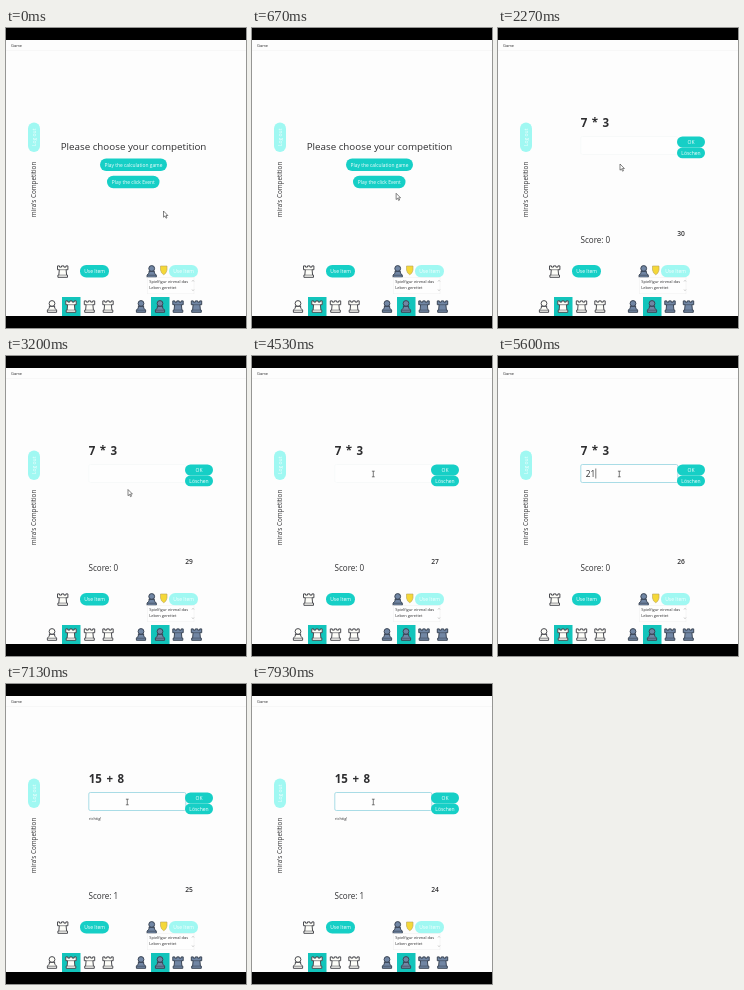
An HTML page for the animation above (8 s loop, 240 px wide and 300 px high).

```html
<!DOCTYPE html>
<html lang="en">
<head>
<meta charset="utf-8">
<title>Game</title>
<style>
  html, body { margin: 0; width: 100%; height: 100%; overflow: hidden; background: #000; }
  svg { display: block; width: 100vw; height: 100vh; }
  text { font-family: "Open Sans", "Noto Sans", sans-serif; fill: #2e2e30; }
  .pill { fill: #16cfc6; }
  .pale { fill: #a0f8f2; }
  .hover { fill: #06605f; }
  .label { fill: #f6ffff; text-anchor: middle; }
  .light { --body: #fdfdf8; --edge: #4a4b50; }
  .dark { --body: #7186a4; --edge: #3b4656; }
  .piece { fill: var(--body); stroke: var(--edge); stroke-width: 1; stroke-linejoin: round; }
</style>
</head>
<body>
<svg viewBox="0 0 240 300" preserveAspectRatio="none">
  <defs>
    <g id="rook" class="piece">
      <path d="M-5.200-5.600h2v1.200h2V-5.600h2.400v1.200h2V-5.600h2V-1.800H3.400L3.900 3.600H4.800V5.800H-4.800V3.600H-3.900L-3.400-1.800H-5.200Z"/>
      <path d="M-3.400-1.800H3.400M-3.900 3.600H3.900" stroke-width=".6"/>
    </g>
    <g id="pawn" class="piece">
      <path d="M-2.200-.6Q-2.400 2-4.600 3.600V5.800H4.600V3.600Q2.400 2 2.200-.6Z"/>
      <circle cy="-3" r="2.900"/>
      <path d="M-3.200-.2H3.200M-4.300 3.700H4.300" stroke-width=".7"/>
    </g>
  </defs>

  <rect y="12" width="240" height="276" fill="#fdfdfd"/>
  <path d="M0 22.500H240" stroke="#f3f3f3" stroke-width=".6"/>
  <text x="5" y="18.600" font-size="4">Game</text>

  <rect class="pale" x="22" y="94.500" width="12" height="29.500" rx="6"/>
  <text class="label" font-size="5" transform="translate(29.700 109.300) rotate(-90)">Log out</text>
  <text font-size="6.300" text-anchor="middle" transform="translate(30.300 161.500) rotate(-90)">mira's Competition</text>

  <g id="menu">
    <text x="127.500" y="121.500" font-size="9.800" text-anchor="middle">Please choose your competition</text>
    <rect id="calc" class="pill" x="94" y="130.500" width="67" height="12.500" rx="6.200"/>
    <text class="label" x="127.500" y="138.600" font-size="4.900">Play the calculation game</text>
    <rect class="pill" x="101" y="147.700" width="52.500" height="12.500" rx="6.200"/>
    <text class="label" x="127.300" y="155.800" font-size="4.900">Play the click Event</text>
  </g>

  <g id="quiz">
    <text id="task" x="82.800" y="98.600" font-size="11.500" font-weight="700" word-spacing="1.500"></text>
    <rect id="field" x="82.800" y="108.500" width="97" height="18" rx="1.500" fill="#fefefe"/>
    <text id="answer" x="87.800" y="120.700" font-size="8.300"></text>
    <path id="caret" d="M97.800 112.500V122.500" stroke="#444" stroke-width=".7"/>
    <rect class="pill" x="179" y="108.500" width="28" height="11" rx="5.500"/>
    <text class="label" x="193" y="115.900" font-size="5">OK</text>
    <rect class="pill" x="179" y="119.500" width="28" height="10.800" rx="5.400"/>
    <text class="label" x="193" y="126.700" font-size="5">Löschen</text>
    <text id="praise" x="83" y="135.700" font-size="3.900">richtig!</text>
    <text id="score" x="82.500" y="214.600" font-size="8.100"></text>
    <text id="timer" x="183" y="208.200" font-size="6.700" font-weight="600" text-anchor="middle"></text>
  </g>

  <use href="#rook" class="light" x="56.700" y="243.500"/>
  <rect class="pill" x="74" y="237" width="29" height="12.500" rx="6.200"/>
  <text class="label" x="88.500" y="245" font-size="5">Use Item</text>
  <use href="#pawn" class="dark" x="145.700" y="243.500"/>
  <path d="M154.500 238h6.500v4q-.4 3.200-3.200 4.800-2.900-1.600-3.300-4.800Z" fill="#f5d838" stroke="#b8a35c" stroke-width=".6"/>
  <rect class="pale" x="163" y="237" width="29" height="12.500" rx="6.200"/>
  <text class="label" x="177.500" y="245" font-size="5">Use Item</text>
  <rect x="141.500" y="249.600" width="46.500" height="16.200" fill="#fefefe" stroke="#efefef" stroke-width=".5"/>
  <text x="143.300" y="254.700" font-size="4">Spielfigur einmal das</text>
  <text x="143.300" y="260.700" font-size="4">Leben gerettet</text>
  <path d="M186 253.500l1-1.200 1 1.200M186 261.500l1 1.200 1-1.200" fill="none" stroke="#999" stroke-width=".5"/>

  <g fill="#12c4bb">
    <rect x="56" y="269" width="18.500" height="19"/>
    <rect x="145" y="269" width="18.500" height="19"/>
  </g>
  <g id="shelf"></g>

  <g id="cursor">
    <path id="arrow" d="M0 0V6.200L1.500 4.900 2.500 7.200 3.500 6.700 2.500 4.500H4.400Z" fill="#fff" stroke="#333" stroke-width=".6"/>
    <path id="hand" d="M0 .5q.8-1 1.300 0V3l2.800.8q.7.400.4 1.600L4 7.600H.9L-1.300 4.800q.2-1 1.300-.2Z" fill="#fff" stroke="#333" stroke-width=".6"/>
    <path id="beam" d="M-1.400-2.800H1.400M0-2.800V2.800M-1.400 2.800H1.400" fill="none" stroke="#444" stroke-width=".7"/>
  </g>
</svg>
<script>
  const LOOP = 8000, START = 1450, FOCUS = 4700, TYPED = 5300, SUBMIT = 6200;
  const $ = id => document.getElementById(id);
  const show = (id, on) => { $(id).style.display = on ? '' : 'none'; };

  const shelf = [
    ['pawn', 'light', 46], ['rook', 'light', 65], ['rook', 'light', 83.5], ['rook', 'light', 102],
    ['pawn', 'dark', 135], ['pawn', 'dark', 154], ['rook', 'dark', 172], ['rook', 'dark', 190.5]
  ];
  $('shelf').innerHTML = shelf.map(([kind, tone, x]) =>
    `<use href="#${kind}" class="${tone}" x="${x}" y="278.500"/>`).join('');

  // time, x, y
  const path = [
    [0, 157.5, 183], [400, 157.5, 183], [1050, 122, 136], [2600, 122, 136],
    [3000, 122, 133.5], [3700, 122, 133.5], [4200, 121.3, 118], [LOOP, 121.3, 118]
  ];

  function pointerAt(t) {
    const i = path.findIndex(p => p[0] > t);
    const [t0, x0, y0] = path[i - 1], [t1, x1, y1] = path[i];
    const p = (t - t0) / (t1 - t0), e = p * p * (3 - 2 * p);
    return [x0 + (x1 - x0) * e, y0 + (y1 - y0) * e];
  }

  function draw(t) {
    const playing = t >= START, solved = t >= SUBMIT, focused = t >= FOCUS;
    const [x, y] = pointerAt(t);
    const overCalc = !playing && y < 143;
    const overField = playing && y < 126.5;
    show('menu', !playing);
    show('quiz', playing);
    $('calc').setAttribute('class', overCalc ? 'hover' : 'pill');

    $('task').textContent = solved ? '15 + 8' : '7 * 3';
    $('answer').textContent = solved || t < TYPED - 200 ? '' : t < TYPED ? '2' : '21';
    $('score').textContent = 'Score: ' + (solved ? 1 : 0);
    $('timer').textContent = 30 - Math.floor((t - START) / 1000);
    show('praise', solved);
    show('caret', t >= TYPED && !solved);
    $('field').setAttribute('stroke', focused ? '#a9dce6' : '#f3f6f6');
    $('field').setAttribute('stroke-width', focused ? 1 : .6);

    show('hand', overCalc);
    show('beam', overField);
    show('arrow', !overCalc && !overField);
    $('cursor').setAttribute('transform', `translate(${x} ${y})`);
  }

  const begin = performance.now();
  function tick() {
    draw((performance.now() - begin) % LOOP);
    requestAnimationFrame(tick);
  }
  tick();
</script>
</body>
</html>
```
